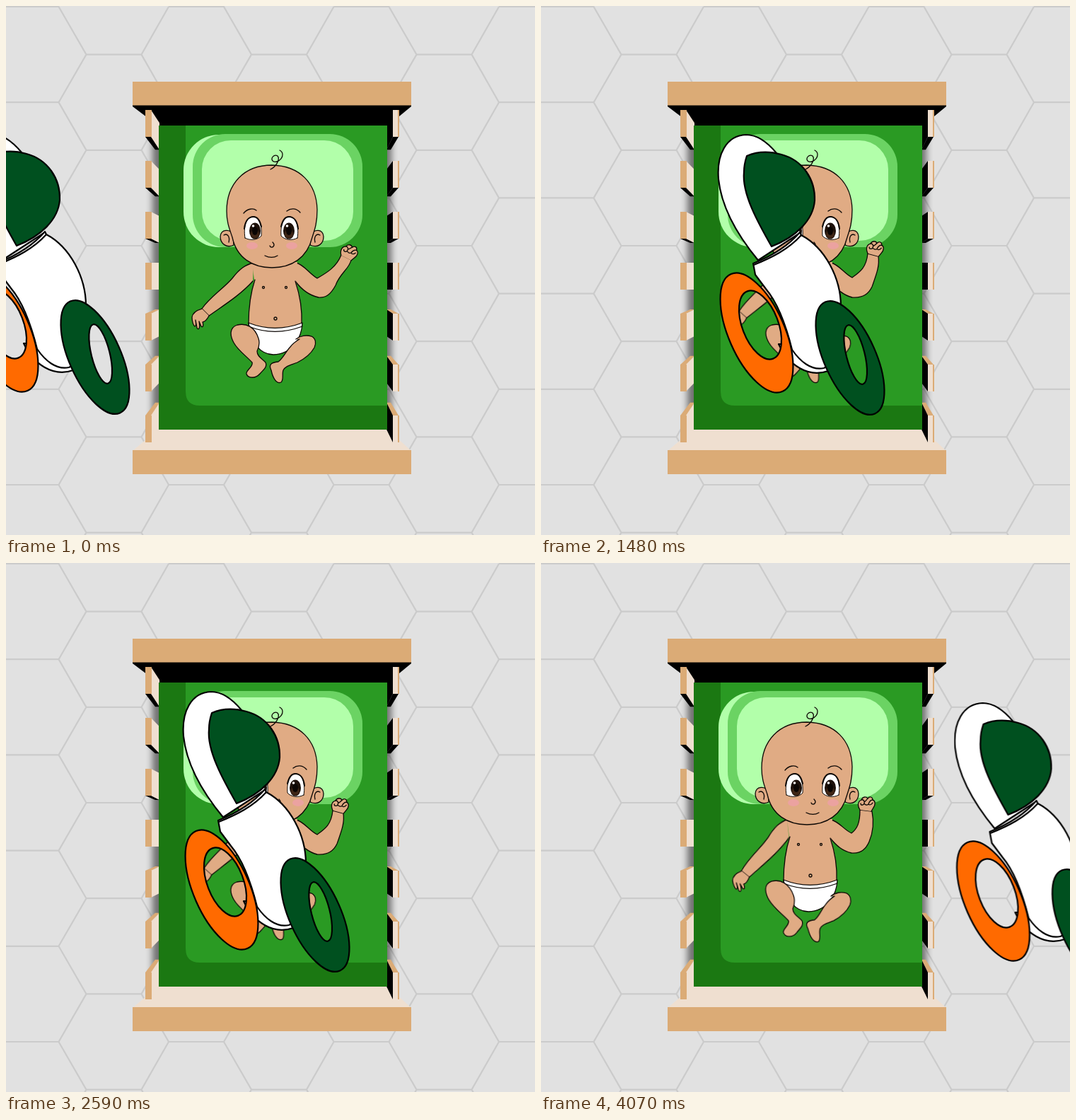
Write an HTML page that moves like this. It is 748 px wide and 748 px high and loops after 4440 ms.

```html
<!DOCTYPE html>
<html lang="en">
<head>
<meta charset="utf-8">
<title>Baby in a crib</title>
<style>
  html, body { margin: 0; width: 100%; height: 100%; overflow: hidden; background: #e1e1e1; }
  svg { display: block; width: 100vw; height: 100vh; }
  .toy, .face, .arm, .leg, .pose { animation: 1110ms step-end infinite; }
  .toy { animation-name: fly; stroke: #000; stroke-width: 2.2; stroke-linejoin: round; }
  .face { animation-name: look; }
  .arm { animation-name: swing; transform-origin: 345px 375px; }
  .leg { animation-name: kick; transform-origin: 380px 470px; }
  .pose { visibility: hidden; animation-name: show; }
  .pose.b { animation-delay: -740ms; }
  .pose.c { animation-delay: -370ms; }
  .skin { fill: #e0ab84; stroke: #0d0805; stroke-width: 1.3; stroke-linejoin: round; stroke-linecap: round; }
  .line { fill: none; }
  .plain { stroke: none; }
  @keyframes fly {
    0% { transform: translate(-311px, -1px); }
    33.333% { transform: none; }
    66.667% { transform: translate(334.5px, 16px); }
  }
  @keyframes look { 0% { transform: none; } 33.333%, 66.667% { transform: translateX(9px); } }
  @keyframes swing { 0% { transform: none; } 33.333% { transform: rotate(-3.2deg); } 66.667% { transform: rotate(-6.5deg); } }
  @keyframes kick { 0% { transform: none; } 33.333% { transform: skewX(1.5deg); } 66.667% { transform: skewX(3deg) scaleY(1.05); } }
  @keyframes show { 0% { visibility: visible; } 33.333%, 100% { visibility: hidden; } }
</style>
</head>
<body>
<svg viewBox="0 0 748 748">
  <defs>
    <filter id="soft" x="-20%" y="-20%" width="140%" height="140%"><feGaussianBlur stdDeviation="5"/></filter>
    <g id="fist">
      <path d="M-9 8C-13 2-12-4-7-6C-5-11 0-11 2-8C5-12 9-10 9-6C13-5 13 1 10 5L7 10"/>
      <path class="line" d="M-7-6C-4-7-2-4-3-1C-4 2-8 2-8-1M2-8C0-6-1-4-3-3M9-6C6-6 4-3 3 0C1 2-2 1-3-1M3 0C5 2 8 0 9-2"/>
    </g>
    <g id="eye">
      <path fill="#fff" stroke-width="1" d="M-11 13C-14-5-8-17 1-17C9-17 13-6 12 10C7 16-4 17-11 13Z"/>
      <path class="line" d="M-12 0C-11-11-6-17 1-17C6-17 10-12 12-3" stroke-width="2"/>
    </g>
    <g id="pupil" stroke="none">
      <ellipse rx="8" ry="11.5" fill="#1d110a"/>
      <ellipse cy="4.500" rx="6" ry="6" fill="#3f2616"/>
      <ellipse cy="0" rx="4" ry="6" fill="#0b0604"/>
      <circle cx="-2.500" cy="-7" r="1.800" fill="#fff"/>
    </g>
  </defs>

  <rect width="748" height="748" fill="#e1e1e1"/>
  <path id="floor" fill="none" stroke="#cbcbcb" stroke-width="2.200"/>

  <!-- crib -->
  <path d="M207 150H545V605H207Z" opacity=".5" filter="url(#soft)"/>
  <path d="M179 140H573V142L539 170H216L179 142Z"/>
  <path d="M216 598H539L573 629H179Z" fill="#efdfd0"/>
  <g id="slats"></g>
  <path d="M179 107H573V140.500H179ZM179 628H573V662H179Z" fill="#dbab76"/>

  <!-- mattress and pillow -->
  <path d="M216 169H539V599H216Z" fill="#1b7812"/>
  <path d="M254 169H539V565H274Q254 565 254 545Z" fill="#2a9a23"/>
  <rect x="251" y="182" width="200" height="159" rx="50" fill="#b2ffaa"/>
  <rect x="264" y="181" width="240" height="160" rx="46" fill="#6bd363"/>
  <rect x="277" y="190" width="214" height="142" rx="41" fill="#b2ffaa"/>

  <!-- baby -->
  <g class="skin">
    <g class="arm">
      <path d="M350 363C338 366 330 372 320 385C308 399 288 412 277 428L287 438C305 425 330 410 349 389"/>
      <path d="M277 428C270 430 264 433 263 440C263 446 265 452 267 453C270 452 268 447 268 444L270 455C272 459 275 456 273 446L276 453C278 455 280 452 278 447C282 446 285 442 287 438"/>
    </g>
    <g class="pose a">
      <path d="M410 363C422 366 428 378 440 385C452 378 467 370 474 352L488 359C486 371 472 378 466 395C459 408 452 413 442 412C428 409 418 401 409 389"/>
      <use href="#fist" transform="translate(485 348) rotate(20)"/>
    </g>
    <g class="pose b">
      <path d="M410 363C422 366 428 378 440 384C451 376 460 370 462 350L477 354C479 368 474 380 468 397C462 410 452 413 440 412C428 409 418 401 409 389"/>
      <use href="#fist" transform="translate(472 343) rotate(8)"/>
    </g>
    <g class="pose c">
      <path d="M410 363C422 366 428 377 439 382C447 376 451 368 451 349L468 351C471 366 469 382 464 394C458 408 448 411 439 410C426 407 418 400 409 389"/>
      <use href="#fist" transform="translate(460 341)"/>
    </g>
    <path class="plain" d="M348 362H412L410 390C416 410 419 430 418 455H343C342 430 347 405 351 388Z"/>
    <path class="line" d="M352 387C346 405 343 430 343 450M409 389C416 410 419 430 418 450"/>
    <g class="line">
      <circle cx="364" cy="398" r="1.500"/><circle cx="396" cy="398" r="1.500"/><circle cx="381" cy="442" r="2"/>
    </g>
    <path fill="#fff" d="M343 448C368 458 395 457 419 448C418 470 405 492 378 493C355 492 346 470 343 448Z"/>
    <path class="line" d="M343 453C368 463 395 462 419 453"/>
    <g class="leg">
      <path d="M357 470C352 454 340 448 327 451C315 455 317 467 322 476C328 487 340 495 348 504C350 510 339 515 340 520C342 527 353 527 359 520C363 515 370 511 367 504C363 499 355 496 355 488C358 482 359 476 357 470"/>
      <path d="M410 471C416 466 425 465 432 467C438 470 439 477 436 483C431 492 422 499 412 504C402 508 395 509 392 515C390 520 393 529 389 532C382 535 377 525 375 515C371 507 375 504 385 503C392 498 396 488 402 482C405 478 410 474 415 471"/>
    </g>

    <!-- head -->
    <path d="M321 323C317 315 304 315 303 326C303 336 312 343 322 338ZM432 323C436 315 448 315 449 326C449 336 441 343 430 338Z"/>
    <path class="line" d="M308 324C313 321 317 326 315 334M444 324C439 321 435 326 437 334"/>
    <path d="M376 225C336 225 312 252 312 290C312 306 316 315 320 327C326 356 349 370 376 370C404 370 426 356 433 327C437 315 440 306 440 288C439 250 415 226 376 225Z"/>
    <path class="line" d="M374 231C382 227 388 217 384 212C379 209 374 215 377 219C382 223 391 217 391 210C391 207 389 205 387 204"/>
    <g class="face">
      <g stroke="none" fill="#eba2a0"><ellipse cx="348" cy="339" rx="8" ry="5"/><ellipse cx="404" cy="339" rx="8" ry="5"/></g>
      <use href="#eye" x="349" y="315"/>
      <use href="#eye" transform="translate(401 315) scale(-1 1)"/>
      <use href="#pupil" x="352" y="318"/>
      <use href="#pupil" x="400" y="318"/>
      <path class="line" d="M336 293C341 287 349 285 354 289M397 290C403 285 411 286 416 292M373 339C374 342 378 342 379 338C379 336 378 335 377 334M366 353C372 356 379 356 384 353"/>
    </g>
  </g>

  <!-- toy -->
  <g class="toy">
    <path fill="#fff" d="M333 208C318 190 304 182 290 182C262 183 248 210 251 245C255 283 276 322 307 359.500L366 321"/>
    <path fill="#00501f" d="M291 212C305 206 322 205 340 210C370 218 388 245 387 275C385 303 360 327 326 340C306 305 284 265 287 235C287 226 289 218 291 212Z"/>
    <path fill="#fff" d="M336 478C350 508 378 526 406 516L410 480Z"/>
    <path fill="#fff" d="M300 364C325 354 348 341 366 320L368 324C402 342 424 385 424 425C422 470 416 505 400 512C382 516 366 502 355 486C346 450 335 420 318 400L303 380Z"/>
    <path fill="none" d="M301 366C326 356 350 344 368 324"/>
    <path id="ringL" fill="#ff6a00" fill-rule="evenodd"/>
    <path id="ringR" fill="#00501f" fill-rule="evenodd"/>
  </g>
</svg>
<script>
  const byId = id => document.getElementById(id);

  // Floor: a honeycomb built from one repeated cell.
  const W = 233.5, H = 135.2;
  let floor = '';
  for (let x = -3.5; x < 748; x += W)
    for (let y = 1; y < 748; y += H)
      floor += `M${x} ${y}h78l39 ${H / 2}h78l38.5 ${-H / 2}M${x + 117} ${y + H / 2}l-39 ${H / 2}M${x + 195} ${y + H / 2}l38.5 ${H / 2}`;
  byId('floor').setAttribute('d', floor);

  // Slats lean towards the middle of the bed.
  const poly = (fill, ...pts) => `<polygon fill="${fill}" points="${pts.join(' ')}"/>`;
  const tan = '#dbab76', cream = '#efdfd0';
  let slats = '';
  for (let i = 0; i < 7; i++) {
    const t = 147 + 72 * i, b = t + 38, d = (382 - t - 19) * 0.085;
    const edge = d > 0 ? b : t, shade = d > 0 ? '#000' : tan;
    slats += poly(shade, 197, edge, 206, edge, 217, edge + d, 211, edge + d)
      + poly(cream, 205, t, 217, t + d, 217, b + d, 205, b)
      + poly(tan, 197, t, 206, t, 206, b, 197, b)
      + poly(shade, 555, edge, 547, edge, 538, edge + d, 544, edge + d)
      + poly('#000', 547, t, 538, t + d, 538, b + d, 547, b)
      + poly(tan, 547, t, 556, t, 556, b, 547, b)
      + poly(cream, 547, t, 554, t, 554, b, 547, b);
  }
  byId('slats').innerHTML = slats;

  // Tilted ellipse: centre, half width, half length, angle.
  const oval = (x, y, a, b, deg) => {
    const r = deg * Math.PI / 180, dx = -b * Math.sin(r), dy = b * Math.cos(r);
    const arc = `A${a} ${b} ${deg} 0 1 `;
    return `M${x + dx} ${y + dy}${arc}${x - dx} ${y - dy}${arc}${x + dx} ${y + dy}Z`;
  };
  byId('ringL').setAttribute('d', oval(305, 462, 39.7, 90.6, -23.7) + oval(310, 451, 25.5, 51, -21));
  byId('ringR').setAttribute('d', oval(437, 497.5, 36.6, 86.4, -24) + oval(444.7, 493, 13, 43, -14));
</script>
</body>
</html>
```
